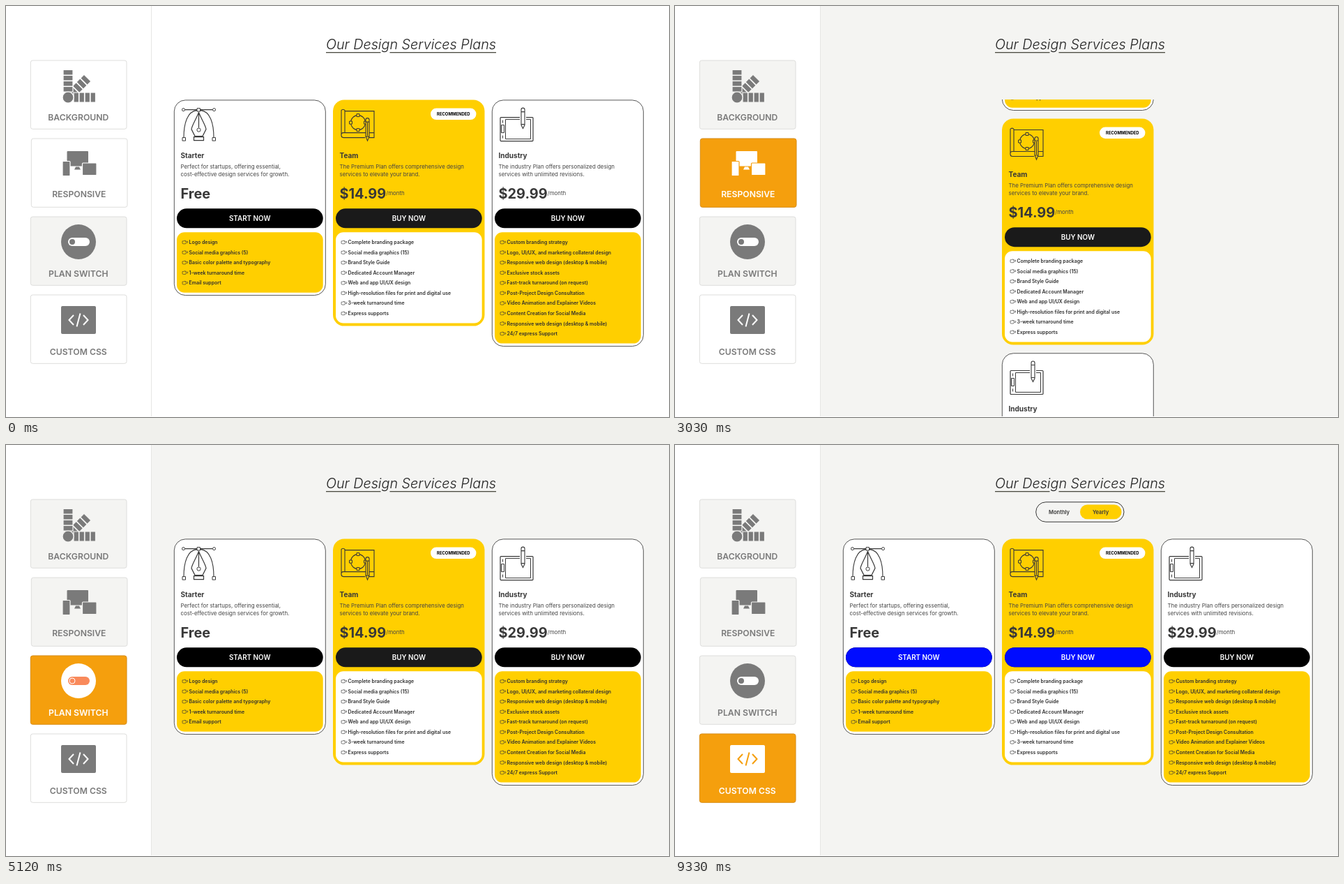
Write an HTML page with a canvas that moves like this. It is 951 px wide and 589 px high and loops after 9.42 s.

```html
<!DOCTYPE html>
<html lang="en">
<head>
<meta charset="utf-8">
<title>Design services plans</title>
<style>
html, body { margin: 0; width: 100%; height: 100%; overflow: hidden; background: #fff; }
canvas { display: block; width: 951px; height: 589px; }
</style>
</head>
<body>
<canvas id="stage" width="951" height="589"></canvas>
<script>
const ctx = document.getElementById('stage').getContext('2d');
const LOOP = 9420;
const WHITE = '#fff', INK = '#383838', GREY = '#7a7a7a', PALE = '#f4f4f2';
const YELLOW = '#ffcf00', ORANGE = '#f59f0d', BLUE = '#000cff';

const clamp = v => Math.max(0, Math.min(1, v));
const ramp = (t, from, to) => clamp((t - from) / (to - from));
const easeInOut = p => p < .5 ? 2 * p * p : 1 - 2 * (1 - p) * (1 - p);
const ease = (t, from, to) => easeInOut(ramp(t, from, to));

function rect(x, y, w, h, fill, r = 0, line, width = 1) {
  ctx.beginPath();
  ctx.roundRect(x, y, w, h, r);
  paint(fill, line, width);
}
function disc(x, y, r, fill, line, width = 1) {
  ctx.beginPath();
  ctx.arc(x, y, r, 0, 7);
  paint(fill, line, width);
}
function shape(d, fill, line, width = 1) {
  const path = new Path2D(d);
  if (fill) { ctx.fillStyle = fill; ctx.fill(path); }
  if (line) { ctx.strokeStyle = line; ctx.lineWidth = width; ctx.stroke(path); }
}
function paint(fill, line, width) {
  if (fill) { ctx.fillStyle = fill; ctx.fill(); }
  if (line) { ctx.strokeStyle = line; ctx.lineWidth = width; ctx.stroke(); }
}
function text(str, x, y, size, weight, color, align = 'left', family = 'Inter, sans-serif') {
  ctx.font = `${weight} ${size}px ${family}`;
  ctx.textAlign = align;
  ctx.fillStyle = color;
  ctx.fillText(str, x, y);
  return ctx.measureText(str).width;
}
function at(x, y, draw) {
  ctx.save();
  ctx.translate(x, y);
  draw();
  ctx.restore();
}
function faded(alpha, draw) {
  if (alpha <= 0) return;
  ctx.save();
  ctx.globalAlpha = alpha;
  draw();
  ctx.restore();
}

// Sidebar icons, relative to the tile corner
function swatchIcon(color, back) {
  for (const angle of [45, 0, 90]) {
    at(54, 53.5, () => {
      ctx.rotate(angle * Math.PI / 180);
      for (let i = 0; i < 4; i++) rect(-7, -15.5 - i * 8, 14, 7.5, color, 0, back, 1.2);
    });
  }
  disc(54, 53.5, 8, color, back, 1.2);
}
function devicesIcon(color, back) {
  rect(51.5, 18.5, 30.5, 21.5, color, 1);
  shape('M64 41h5l2 4h-9z', color);
  rect(45, 33, 11, 21, color, 1, back, 1.2);
  rect(73.5, 35.5, 20.5, 17.5, color, 1, back, 1.2);
}
function switchIcon(color, back, on) {
  const pill = on ? '#f98a5b' : WHITE;
  disc(69, 36.5, 25, color);
  rect(54, 30.5, 31, 12, pill, 6);
  disc(60, 36.5, 4, on ? pill : color, on ? WHITE : null);
}
function codeIcon(color, back, on) {
  rect(44, 16.5, 50, 40, color, 2);
  shape('M62 29.5l-6.5 7 6.5 7M76 29.5l6.5 7-6.5 7M71.5 27l-5 19', null, on ? ORANGE : WHITE, 2);
}

const tiles = [
  { label: 'BACKGROUND', x: 35, y: 77.5, base: 86.5, icon: swatchIcon, from: 30, to: 1270, rest: WHITE },
  { label: 'RESPONSIVE', x: 36, y: 189.5, base: 84, icon: devicesIcon, from: 1270, to: 3830, rest: WHITE },
  { label: 'PLAN SWITCH', x: 35, y: 301.5, base: 86.5, icon: switchIcon, from: 3830, to: 6150, rest: PALE },
  { label: 'CUSTOM CSS', x: 35, y: 413.5, base: 86.5, icon: codeIcon, from: 6150, to: LOOP, rest: WHITE }
];

function drawTile(tile, t) {
  const face = (back, line, color, on) => at(tile.x, tile.y, () => {
    rect(.3, .5, 137.7, 98.3, back, 3, line);
    tile.icon(color, back, on);
    text(tile.label, 68.8, tile.base, 12.2, 600, color, 'center');
  });
  face(t > tile.from + 300 ? PALE : tile.rest, '#dededc', GREY, false);
  const lit = ease(t, tile.from, tile.from + 300) - ease(t, tile.to, tile.to + 300);
  faded(lit, () => face(ORANGE, '#dc8f16', WHITE, true));
}

// Plan icons, relative to a 48px box
function penIcon() {
  shape('M5 3h17M27 3h17M3 43C3 23 8 5 22 4M46 43C46 23 41 5 27 4', null, INK, 1.1);
  shape('M24.5 7C20 18 15 25 14 31l5 10h11l5-10C34 25 29 18 24.5 7zV29M17.5 42h14v5h-14z', null, INK, 1.2);
  disc(24.5, 32, 2.6, WHITE, INK);
  disc(2.5, 3, 2, WHITE, INK);
  disc(46.5, 3, 2, WHITE, INK);
  for (const [x, y] of [[22, 1], [1, 43], [44, 43]]) rect(x, y, 4.5, 4.5, WHITE, 0, INK);
}
function blueprintIcon() {
  shape('M6 36V4a3 3 0 0 0-5 0v36a3 3 0 0 0 3 3h31M6 5h42v31H4a3 3 0 0 0-3 4M41 43h7v-7', null, INK, 1.1);
  disc(25, 21.5, 10.5, null, INK, 1.1);
  for (const [x, y] of [[0, -10.5], [0, 10.5], [-10.5, 0], [10.5, 0]])
    rect(23 + x, 19.5 + y, 4, 4, YELLOW, 0, INK);
  shape('M36 17.5a2.3 2.3 0 0 1 5 0v24l-2.5 6-2.5-6zM36 20.5h5M36 41.5h5M38.5 21.5v19', YELLOW, INK, 1.1);
}
function tabletIcon() {
  rect(1, 14, 47, 34, null, 1, INK, 1.2);
  rect(8.5, 17, 36, 28, null, 0, INK, 1);
  rect(2.5, 25, 4, 11, WHITE, 0, INK);
  shape('M4.5 18v4M4.5 40v4', null, INK);
  shape('M31 3a2.5 2.5 0 0 1 5 0v22l-2.5 5-2.5-5z', WHITE, WHITE, 4);
  shape('M31 3a2.5 2.5 0 0 1 5 0v22l-2.5 5-2.5-5zM31 6h5M31 24h5', WHITE, INK, 1.1);
}
function handBullet(x, y) {
  at(x, y, () => {
    shape('M0-1.7h1.4L3-2.4h1.5L4-1.2h3a.9.9 0 0 1 0 1.8H5l-.5 1.6H1.5L0 1.6z', null, INK, .65);
  });
}

const plans = [
  {
    x: 241, stack: 0, drift: 228, h: 280, icon: penIcon, name: 'Starter', price: 'Free', action: 'START NOW',
    about: ['Perfect for startups, offering essential,', 'cost-effective design services for growth.'],
    items: ['Logo design', 'Social media graphics (5)', 'Basic color palette and typography',
      '1-week turnaround time', 'Email support']
  },
  {
    x: 469, stack: 292, drift: 0, h: 324, icon: blueprintIcon, name: 'Team', price: '$14.99', action: 'BUY NOW',
    featured: true,
    about: ['The Premium Plan offers comprehensive design', 'services to elevate your brand.'],
    items: ['Complete branding package', 'Social media graphics (15)', 'Brand Style Guide',
      'Dedicated Account Manager', 'Web and app UI/UX design',
      'High-resolution files for print and digital use', '3-week turnaround time', 'Express supports']
  },
  {
    x: 697, stack: 628, drift: -228, h: 353, icon: tabletIcon, name: 'Industry', price: '$29.99', action: 'BUY NOW',
    about: ['The industry Plan offers personalized design', 'services with unlimited revisions.'],
    items: ['Custom branding strategy', 'Logo, UI/UX, and marketing collateral design',
      'Responsive web design (desktop & mobile)', 'Exclusive stock assets', 'Fast-track turnaround (on request)',
      'Post-Project Design Consultation', 'Video Animation and Explainer Videos',
      'Content Creation for Social Media', 'Responsive web design (desktop & mobile)', '24/7 express Support']
  }
];

function drawPlan(plan, blue) {
  const { featured, items } = plan;
  if (featured) {
    rect(0, 0, 217.5, plan.h, YELLOW, 16);
    rect(140, 12, 65.5, 16.5, WHITE, 8.25);
    text('RECOMMENDED', 172.8, 22.5, 5.9, 700, '#000', 'center');
  } else {
    rect(.3, .3, 217, plan.h - .3, WHITE, 16, '#444', .9);
  }
  at(11, 11, plan.icon);
  text(plan.name, 9.5, 83.5, 10, 700, INK);
  plan.about.forEach((line, i) => text(line, 9.5, 98.4 + i * 11, 7.9, 400, '#444'));
  const width = text(plan.price, 9.5, 141.4, 19.9, 700, INK);
  if (plan.price !== 'Free') text('/month', 9.7 + width, 136.4, 7.9, 400, '#444');

  rect(4, 155.7, 209.7, 28, featured ? '#1a1a1a' : '#000', 14);
  if (plan.name !== 'Industry') faded(blue, () => rect(4, 155.7, 209.7, 28, BLUE, 14));
  text(plan.action, 108.8, 173.3, 9.9, 600, WHITE, 'center');

  rect(4, 189.7, 209.7, 13.7 + items.length * 14.56, featured ? WHITE : YELLOW, 11);
  items.forEach((item, i) => {
    const y = 204 + i * 14.56;
    handBullet(12, y);
    text(item, 21.5, y + 2.5, 6.95, 600, '#2e2e2e');
  });
}

function drawPlans(t) {
  const gather = ease(t, 1740, 2240) - ease(t, 3830, 4330);
  const scroll = 602.5 * ease(t, 2334, 3820);
  const blue = ramp(t, 8700, 8850);
  ctx.save();
  ctx.beginPath();
  ctx.rect(209, 134, 742, 455);
  ctx.clip();
  for (const plan of plans)
    at(plan.x + plan.drift * gather, 134.6 + (plan.stack - scroll) * gather, () => drawPlan(plan, blue));
  ctx.restore();
}

function drawTitle() {
  const title = 'Our Design Services Plans';
  const width = text(title, 581, 62, 19.75, 'italic 300', '#222', 'center');
  const left = 581 - width / 2;
  const gap = left + ctx.measureText('Our Desi').width;
  ctx.fillStyle = '#4a4a40';
  ctx.fillRect(left, 66, gap - left - 1, 1.3);
  ctx.fillRect(gap + 12, 66, left + width - gap - 12, 1.3);
}

function drawPeriodSwitch(t) {
  faded(ramp(t, 5170, 5400), () => {
    rect(517.7, 81.8, 126.3, 28.4, PALE, 14.2, INK, 1);
    rect(522 + 59 * ease(t, 5560, 5900), 85.5, 59.5, 20.8, YELLOW, 10.4);
    text('Monthly', 551, 98.7, 7.6, 600, INK, 'center');
    text('Yearly', 610.5, 98.7, 7.6, 600, INK, 'center');
  });
}

const CODE = '.button {\n  background: blue;\n}';

function drawPanel(t) {
  const shown = ease(t, 6632, 7132) - ease(t, 9030, 9320);
  if (shown <= 0) return;
  at(951 - 246 * shown, 0, () => {
    rect(0, 0, 248, 589, WHITE);
    rect(0, 0, 1, 589, '#cfcfcd');
    text('CSS', 18.5, 37.5, 22.3, 700, '#5c5a4c');
    const typed = CODE.slice(0, Math.floor(CODE.length * ramp(t, 7250, 8350)));
    typed.split('\n').forEach((line, i) =>
      text(line, 19, 66 + i * 16, 11, 400, '#444', 'left', '"Noto Sans Mono", monospace'));
    rect(18.5, 237.5, 212, 29.5, '#000', 7);
    text('UPDATE', 124.7, 255.8, 8.85, 600, WHITE, 'center');
  });
}

function draw(t) {
  ctx.fillStyle = WHITE;
  ctx.fillRect(0, 0, 951, 589);
  faded((ramp(t, 30, 610) + ramp(t, 910, 1090)) / 2, () => rect(208, 0, 743, 588, PALE));
  rect(208, 0, 1, 588, '#e6e6e4');
  tiles.forEach(tile => drawTile(tile, t));
  drawTitle();
  drawPeriodSwitch(t);
  drawPlans(t);
  drawPanel(t);
  rect(209, 588, 742, 1, WHITE);
}

const start = performance.now();
function tick() {
  draw((performance.now() - start) % LOOP);
  requestAnimationFrame(tick);
}
tick();
</script>
</body>
</html>
```
